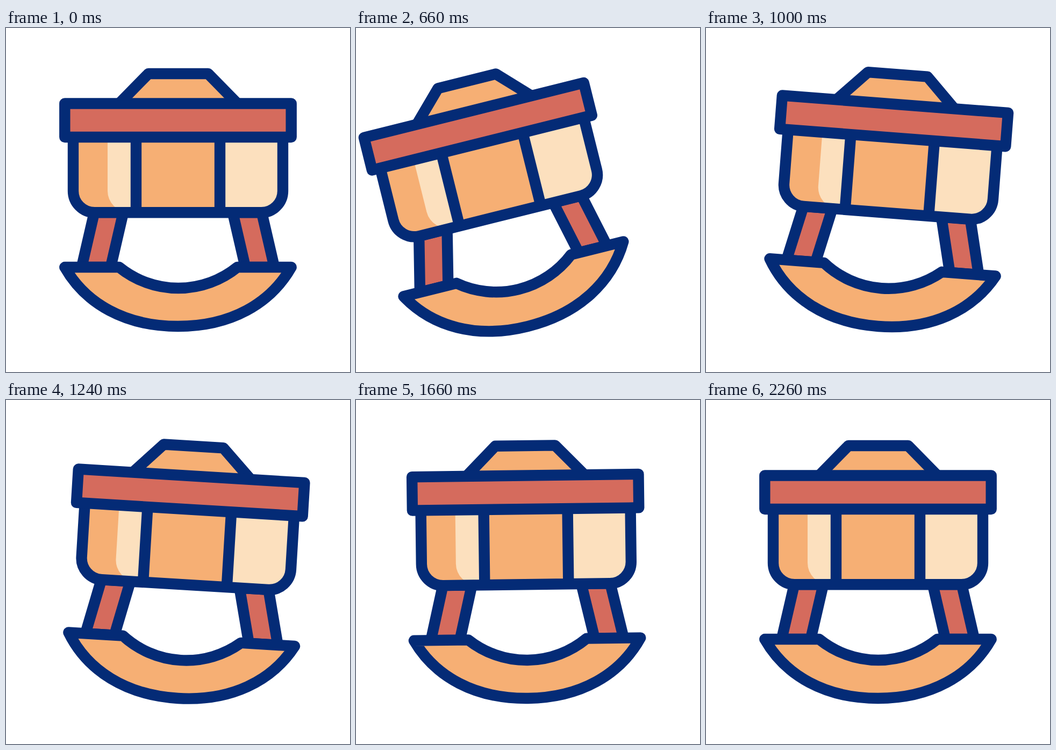
Recreate the animation shown at these times as an HTML page. Size 640 by 640 pixels, loop 2400 ms.

```html
<!DOCTYPE html>
<html>
<head>
<meta charset="utf-8">
<style>
  html, body { margin: 0; height: 100%; overflow: hidden; background: #fff; }
  svg { display: block; width: 100vw; height: 100vh; }
  #cradle { stroke: #042b76; stroke-width: 20.4; stroke-linejoin: round; stroke-linecap: round; }
  .wood { fill: #f6af74; }
  .pale { fill: #fce0be; stroke: none; }
  .red { fill: #d56b5d; }
  .line { fill: none; }
</style>
</head>
<body>
<svg viewBox="0 0 640 640">
  <g id="cradle">
    <path id="leg" class="red" d="M164.3 343L140.7 445H194.7L218.3 343Z"/>
    <use href="#leg" transform="matrix(-1 0 0 1 640 0)"/>
    <path class="wood" d="M109.3 445H210.5A174.6 174.6 0 0 0 430.5 445H530.7C492 513 418 555 320 555S148 513 109.3 445Z"/>
    <path class="wood" d="M213 138L265 85H376L428 138"/>
    <path class="wood" stroke="none" d="M125 203H515V303A40 40 0 0 1 475 343H165A40 40 0 0 1 125 303Z"/>
    <path class="pale" d="M189 203H242V343H229A40 40 0 0 1 189 303Z"/>
    <path class="pale" d="M398 203H515V303A40 40 0 0 1 475 343H398Z"/>
    <path class="line" d="M125 203V303A40 40 0 0 0 165 343.2H475A40 40 0 0 0 515 303V203M242 203V343M398 203V343"/>
    <path class="red" d="M109.3 140.5H530.7V203H109.3Z"/>
  </g>
</svg>
<script>
  const LOOP = 2400;
  // [time in ms, angle in degrees]: a swing that dies away
  const swings = [[0, 0], [667, -14], [1100, 7], [1467, -4], [1833, 2], [2267, 0], [LOOP, 0]];
  const cradle = document.getElementById('cradle');

  function angleAt(t) {
    const i = swings.findIndex(([time]) => time > t);
    const [t0, a0] = swings[i - 1], [t1, a1] = swings[i];
    const eased = (1 - Math.cos(Math.PI * (t - t0) / (t1 - t0))) / 2;
    return a0 + (a1 - a0) * eased;
  }

  function draw() {
    const angle = angleAt(performance.now() % LOOP);
    cradle.setAttribute('transform', `rotate(${angle} 320 557)`);
    requestAnimationFrame(draw);
  }
  draw();
</script>
</body>
</html>
```
